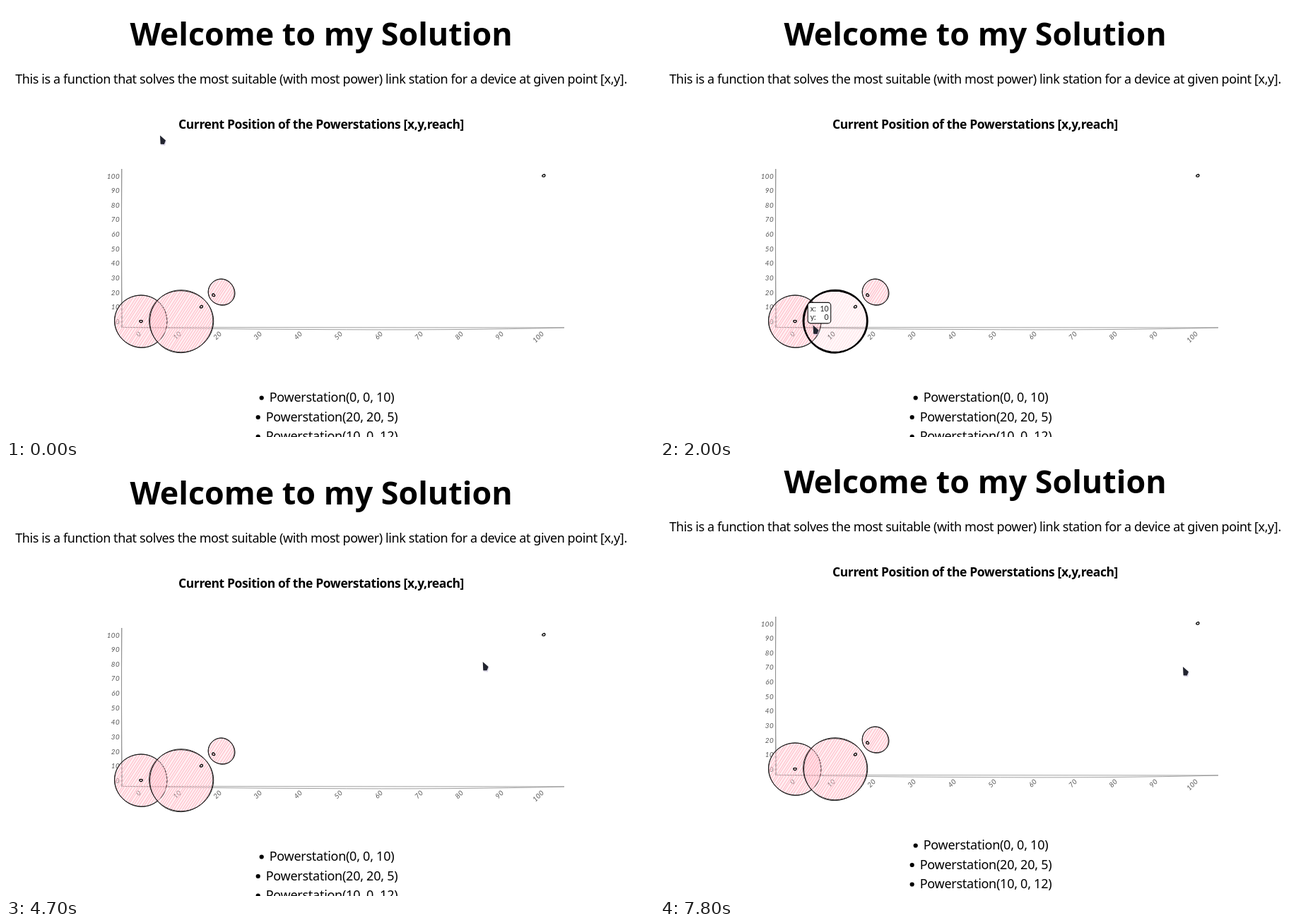
An HTML page for the animation above (8000 ms loop, 917 by 611 pixels).

```html
<!DOCTYPE html>
<html lang="en">
<head>
<meta charset="utf-8">
<title>Powerstations</title>
<style>
html, body { margin: 0; width: 100%; height: 100%; overflow: hidden; background: #fff; }
svg { display: block; width: 100vw; height: 100vh; }
text { font: 18px "Noto Sans", sans-serif; fill: #000; text-anchor: middle; }
.title { font-size: 44.8px; font-weight: 700; }
.intro { letter-spacing: -.41px; }
.sub { font-size: 17.5px; font-weight: 700; letter-spacing: -.41px; }
.item { letter-spacing: -.27px; }
.tick { font: italic 9.8px Lato, sans-serif; letter-spacing: .4px; fill: #555; text-anchor: end; }
.axis { fill: none; stroke: #888; stroke-width: .8; }
.edge { fill: none; stroke: #111; stroke-width: .9; }
.hatch { stroke: #ffc0cb; stroke-width: 1.1; }
.on .edge { stroke-width: 2; stroke: #000; }
.on .fill { opacity: .4; }
.dot { fill: none; stroke: #000; stroke-width: 1.3; }
#tip rect { fill: #fff; stroke: #111; stroke-width: 1.1; }
#tip text { font: 10.5px Lato, sans-serif; fill: #222; text-anchor: start; }
#tip .val { text-anchor: end; }
</style>
</head>
<body>
<svg viewBox="0 0 917 611">
  <defs id="defs"></defs>
  <g id="page">
    <text class="title" x="446" y="56">Welcome to my Solution</text>
    <text class="intro" x="446" y="109.5">This is a function that solves the most suitable (with most power) link station for a device at given point [x,y].</text>
    <text class="sub" x="446" y="174">Current Position of the Powerstations [x,y,reach]</text>
    <g id="chart">
      <path class="axis" d="M163.5 231V455.5M164 231Q162.8 340 164.6 456"/>
      <path class="axis" d="M163 455.5L790 456M163 455.5Q290 458 430 458.5Q640 460 790 456"/>
    </g>
    <g id="list"></g>
    <g id="tip">
      <rect rx="4" height="29.5"/>
      <text x="3.5" y="12.5">x:</text><text class="val" y="12.5"></text>
      <text x="3.5" y="24.5">y:</text><text class="val" y="24.5"></text>
    </g>
  </g>
  <g id="cursor">
    <path d="M1 2L9 8.5L7 14.5L1 14Z" fill="#b9b0d0" opacity=".45"/>
    <path d="M0 0L8 7L5.8 12.4L.6 12.2Z" fill="#22242f"/>
  </g>
</svg>
<script>
const LOOP = 8000, STEP = 100, SCROLL_AT = 7800, LAG = 30;
const $ = id => document.getElementById(id);
const chart = $('chart'), tip = $('tip');

const stations = [[0, 0, 10], [20, 20, 5], [10, 0, 12]];
const devices = [[0, 0], [15, 10], [18, 18], [100, 100]];
const px = x => 191 + 5.7 * x;
const py = y => 447 - 2.065 * y;

function add(parent, tag, attrs, text) {
  const el = document.createElementNS('http://www.w3.org/2000/svg', tag);
  for (const k in attrs) el.setAttribute(k, attrs[k]);
  if (text !== undefined) el.textContent = text;
  parent.appendChild(el);
  return el;
}

let seed = 7;
const rand = () => (seed = seed * 16807 % 2147483647) / 2147483647;

// Closed, slightly wavering outline
function loopPath(cx, cy, rx, ry, wave) {
  const phase = rand() * 6.28;
  let d = '';
  for (let i = 0; i < 48; i++) {
    const a = i / 48 * 2 * Math.PI;
    const w = wave * (Math.sin(2 * a + phase) + .6 * Math.sin(3 * a + 2 * phase));
    d += `${i ? 'L' : 'M'}${cx + (rx + w) * Math.cos(a)} ${cy + (ry + w) * Math.sin(a)}`;
  }
  return d + 'Z';
}

function drawStation([x, y, reach], i) {
  const cx = px(x), cy = py(y), rx = 3.76 * reach, ry = 3.67 * reach;
  const g = add(chart, 'g', {});
  const clip = add($('defs'), 'clipPath', { id: 'clip' + i });
  add(clip, 'ellipse', { cx, cy, rx, ry });
  const fill = add(g, 'g', { class: 'fill', 'clip-path': `url(#clip${i})` });
  add(fill, 'ellipse', { cx, cy, rx, ry, fill: '#ffc0cb', opacity: .26 });
  let d = '';
  for (let s = -2 * rx; s < 2 * rx; s += 3.8) {
    const lean = .65 * rx, mid = cx + s + rand();
    d += `M${mid - lean + rand()} ${cy + rx}L${mid + lean} ${cy - rx}`;
  }
  add(fill, 'path', { class: 'hatch', d });
  for (let n = 0; n < 2; n++) {
    add(g, 'path', { class: 'edge', d: loopPath(cx, cy, rx, ry, .5) });
  }
  return g;
}

for (let v = 0; v <= 100; v += 10) {
  add(chart, 'text', { class: 'tick', x: 161, y: py(v) + 4 }, v);
  add(chart, 'text', {
    class: 'tick', y: 3.7, transform: `translate(${px(v) - 1.5} 462.5) rotate(-45)`
  }, v);
}

const circles = stations.map(drawStation);
for (const [x, y] of devices) {
  add(chart, 'path', { class: 'dot', d: loopPath(px(x), py(y), 1.9, 1.8, .25) });
}

stations.forEach((s, i) => {
  const y = 561 + 27.5 * i;
  const label = add($('list'), 'text', { class: 'item', x: 461, y }, `Powerstation(${s.join(', ')})`);
  const cx = 461 - label.getComputedTextLength() / 2 - 11;
  add($('list'), 'circle', { cx, cy: y - 5.5, r: 3.1 });
});

// Pointer moves: start, end, and where it comes to rest
const home = [218, 183.5];
const moves = [
  [200, 1100, 191, 433], [1100, 1500, 189, 464], [1700, 2400, 259, 435],
  [2800, 3000, 285, 424], [3300, 4000, 320, 399], [4200, 4870, 742.5, 256],
  [5000, 5500, 758, 239], [6200, 6300, 760, 240], [6800, 6900, 758.5, 255],
  [7000, 7100, 760, 240], [7100, 7200, 740, 286]
];

function pointerAt(t) {
  let [x, y] = home;
  for (const [from, to, nx, ny] of moves) {
    if (t <= from) break;
    const f = Math.min(1, (t - from) / (to - from));
    const ease = f * f * (3 - 2 * f);
    x += (nx - x) * ease;
    y += (ny - y) * ease;
  }
  return [x, y];
}

// Hovers: start, end, and the item under the pointer
const hovers = [
  [900, 1500, stations[0]], [1900, 3400, stations[2]], [3500, 4300, stations[1]],
  [6500, 6700, devices[3]], [7100, 7200, devices[3]]
];

const place = (el, x, y) => el.setAttribute('transform', `translate(${x} ${y})`);
const frame = tip.querySelector('rect'), vals = tip.querySelectorAll('.val');

function showTip(item, t) {
  const [x, y] = pointerAt(t - LAG);
  const width = 22.5 + 5 * String(item[0]).length;
  place(tip, x - 3, y - 34);
  frame.setAttribute('width', width);
  vals.forEach((el, i) => {
    el.textContent = item[i];
    el.setAttribute('x', width - 3);
  });
}

function draw(now) {
  const t = Math.floor(now % LOOP / STEP) * STEP;
  place($('page'), 0, t >= SCROLL_AT ? -16 : 0);
  place($('cursor'), ...pointerAt(t));
  const hover = hovers.find(([from, to]) => t >= from && t < to);
  const item = hover && hover[2];
  circles.forEach((g, i) => g.classList.toggle('on', stations[i] === item));
  tip.style.display = item ? '' : 'none';
  if (item) showTip(item, t);
}

const start = performance.now();
function tick() {
  draw(performance.now() - start);
  requestAnimationFrame(tick);
}
tick();
</script>
</body>
</html>
```
